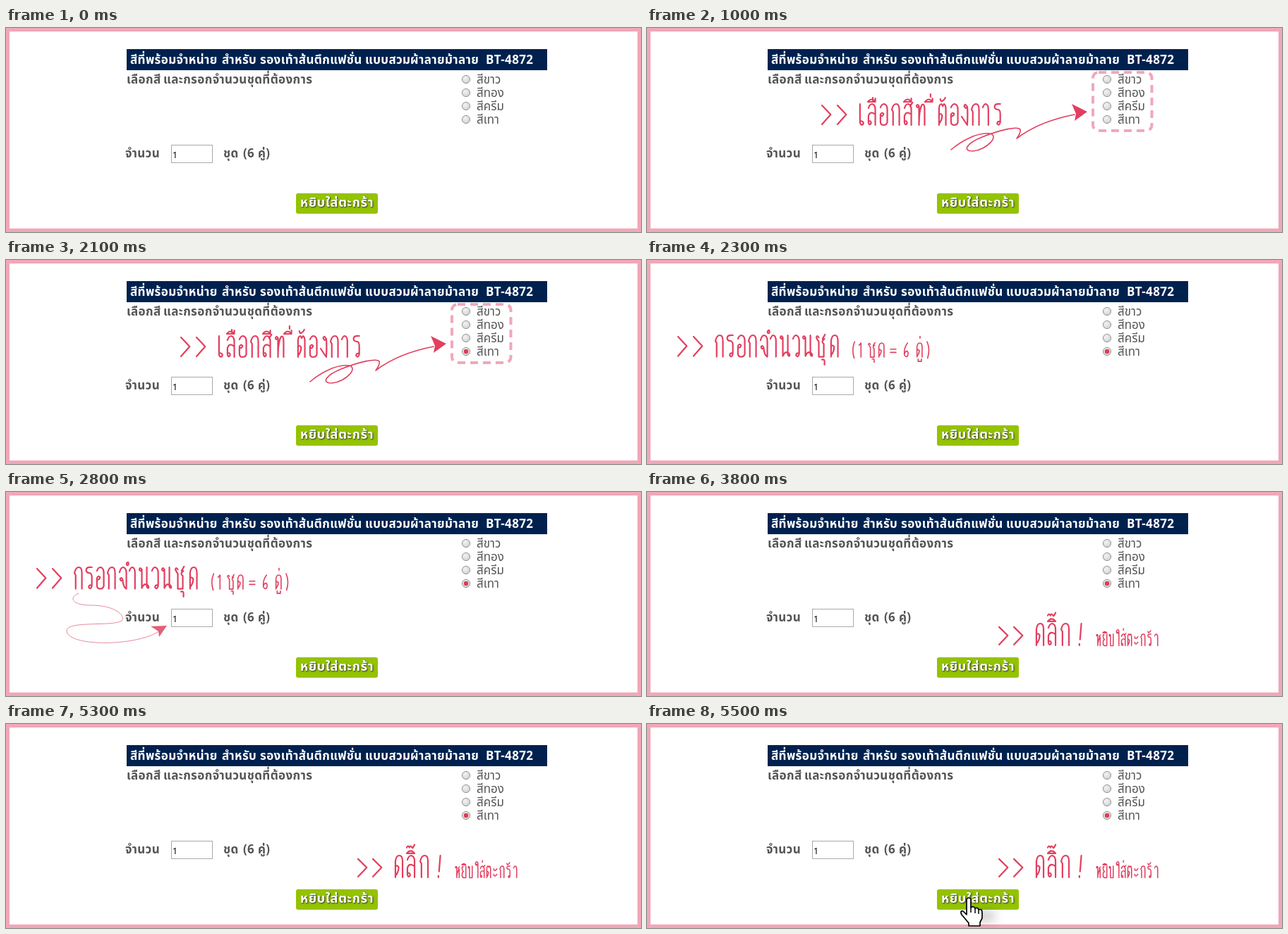
Write an HTML page that moves like this. It is 900x290 px and loops after 6000 ms.

```html
<!DOCTYPE html>
<html lang="th">
<head>
<meta charset="utf-8">
<title>วิธีสั่งซื้อ</title>
<style>
html, body { margin: 0; width: 100%; height: 100%; overflow: hidden; background: #fff; }
svg { display: block; width: 900px; height: 290px; }
text { font-family: "Noto Sans", "Noto Sans Thai", sans-serif; font-size: 17px; fill: #555; }
.bold text { font-weight: 700; letter-spacing: .35px; }
.head text { fill: #fff; }
.button text { font-size: 18px; letter-spacing: .7px; fill: #fff; text-shadow: 1px 1px 2px #333; }
.ink { fill: none; stroke: #e23f5f; stroke-linecap: round; stroke-linejoin: round; }
.ink path { vector-effect: non-scaling-stroke; }
.solid { fill: #e23f5f; }
.cue { opacity: 0; animation: 6s step-end infinite; }
#pick { animation-name: pick; }
#dot { animation-name: dot; }
#fill { animation-name: fill; }
#loop { animation-name: loop; }
#click { animation-name: click; }
#hand { animation-name: hand; }
@keyframes pick { 0% { opacity: 0 } 16.667% { opacity: 1 } 38.333%, 100% { opacity: 0 } }
@keyframes dot {
  0% { opacity: 0; transform: translateY(0) }
  25% { opacity: 1; transform: translateY(0) }
  28.333% { opacity: 1; transform: translateY(19px) }
  31.667% { opacity: 1; transform: translateY(38px) }
  35%, 100% { opacity: 1; transform: translateY(57px) }
}
@keyframes fill { 0% { opacity: 0 } 38.333% { opacity: 1 } 63.333%, 100% { opacity: 0 } }
@keyframes loop { 0% { opacity: 0 } 46.667% { opacity: 1 } 63.333%, 100% { opacity: 0 } }
@keyframes click { 0% { opacity: 0 } 63.333%, 100% { opacity: 1 } }
@keyframes hand { 0% { opacity: 0 } 80% { opacity: 1 } 88.333% { opacity: 0 } 91.667%, 100% { opacity: 1 } }
</style>
</head>
<body>
<svg viewBox="0 0 900 290">
  <defs>
    <radialGradient id="knob" cx=".4" cy=".35" r=".7">
      <stop offset="0" stop-color="#f4f4f4"/><stop offset="1" stop-color="#cfcfcf"/>
    </radialGradient>
    <filter id="soft" x="-100%" y="-150%" width="300%" height="400%"><feGaussianBlur stdDeviation="7"/></filter>
  </defs>
  <rect width="900" height="290" fill="#f0a8b9"/>
  <rect x="5" y="5" width="890" height="280" fill="#fff"/>
  <rect x="171" y="30" width="596" height="30" fill="#00214e"/>
  <g class="head bold">
    <text x="176" y="51">สีที่พร้อมจำหน่าย</text>
    <text x="306" y="51">สำหรับ</text>
    <text x="360" y="51">รองเท้าส้นตึกแฟชั่น</text>
    <text x="509" y="51">แบบสวม</text>
    <text x="573" y="51">ผ้าลายม้าลาย</text>
    <text x="680" y="51">BT-4872</text>
  </g>
  <g class="bold">
    <text x="171" y="79">เลือกสี</text>
    <text x="223" y="79">และกรอกจำนวนชุดที่ต้องการ</text>
    <text x="169" y="184">จำนวน</text>
    <text x="308" y="184">ชุด</text>
    <text x="336" y="184">(6 คู่)</text>
  </g>
  <g id="radios"></g>
  <circle id="dot" class="cue" cx="652" cy="73" r="3.2" fill="#dc3c56"/>
  <rect x="234.5" y="166.5" width="58" height="25" fill="#fff" stroke="#a9a9a9"/>
  <text x="236" y="185" style="font-size:12.5px;fill:#000">1</text>
  <g class="button bold">
    <rect x="411" y="235" width="116" height="29" rx="3" fill="#94c300"/>
    <text x="417" y="254">หยิบใส่ตะกร้า</text>
  </g>

  <g id="pick" class="cue">
    <rect x="632" y="63" width="83.5" height="83" rx="8" fill="none" stroke="#f0a8b9" stroke-width="4" stroke-dasharray="11 7"/>
    <path class="ink" stroke-width="1.6" d="M431 173C445 161 468 148 486 150C500 153 482 173 462 175C445 175 455 163 475 155C500 145 525 139 529 144Q530 149 524 157C545 141 575 129 606 123"/>
    <path class="solid" d="M602 108L624 119L606 132L608 122Z"/>
  </g>
  <g id="fill" class="cue"></g>
  <g id="loop" class="cue">
    <path class="ink" style="stroke:#e5899b" d="M103 144C88 150 94 161 120 161C158 161 170 178 164 183C150 192 85 182 86 198C90 221 190 219 218 197"/>
    <path class="solid" style="fill:#e0607a" d="M205 191L228 190L217 206L216 198Z"/>
  </g>
  <g id="click" class="cue"></g>
  <g id="hand" class="cue">
    <ellipse cx="478" cy="273" rx="18" ry="9" opacity=".18" filter="url(#soft)"/>
    <path d="M453 249Q456 245 459 249V261Q463 258 465 262Q469 260 470 264Q475 262 475 268V276L472 282V287H456V283L446 271Q443 265 448 266L453 271Z" fill="#fff" stroke="#000" stroke-width="1.7" stroke-linejoin="round"/>
    <path d="M459 261V268M465 262V269M470 264V270" stroke="#000" stroke-width="1.5"/>
  </g>
</svg>
<script>
// Handwritten letters, drawn in a cell 12 wide and 30 high
const glyphs = {
  '>': 'M0 2L14 15L0 29',
  'เ': 'M1 0V26Q2 31 6 29Q8 25 2 24',
  'ล': 'M1 6Q3 0 7 0Q12 1 12 8V30M12 15Q4 9 1 17V26Q2 31 5 28Q6 24 2 24',
  'ส': 'M1 6Q3 0 7 0Q12 1 12 8V30M12 15Q4 9 1 17V26Q2 31 5 28Q6 24 2 24M10 3L14-2',
  'อ': 'M1 5Q3 0 7 0Q12 1 12 8V26Q11 30 6 30Q1 30 1 25V15Q3 11 6 14Q5 18 1 17',
  'ก': 'M2 30V11L0 8Q2 0 7 0Q12 0 12 8V30',
  'ท': 'M4 3Q1-1 0 3Q1 7 4 3V30Q4 8 9 1Q13-1 13 8V30',
  'ต': 'M1 30V8Q1 0 5 0L7 3L9 0Q12 1 12 8V30M1 28Q6 23 6 16Q3 12 1 16',
  'ค': 'M1 30V8Q2 0 7 0Q12 0 12 8V30M1 28Q6 23 6 16Q3 12 1 16',
  'ง': 'M9 5Q6-2 4 3Q6 8 9 4Q10 12 9 30L0 18',
  'า': 'M1 5Q3 0 6 0Q10 1 10 8V30',
  'ำ': 'M1 5Q3 0 6 0Q10 1 10 8V30M-1-7Q-5-6-3-3Q1-2-1-7',
  'ร': 'M11 0Q1-1 2 5Q3 8 8 8Q11 9 11 14V26Q9 32 6 28Q6 24 11 25',
  'จ': 'M1 7Q3 0 7 0Q12 1 12 8V30Q7 28 6 17Q4 13 2 16Q2 20 6 18',
  'น': 'M4 3Q1-1 0 3Q1 7 4 3V29Q8 21 12 25M12 0V27Q15 31 15 27Q13 23 10 24',
  'ว': 'M1 5Q3 0 6 0Q11 1 11 8V26Q9 32 6 28Q6 24 11 25',
  'ช': 'M4 3Q1-1 0 3Q2 7 4 9V30H12V12Q7 9 13 5M10 5L14-1',
  'ห': 'M4 3Q1-1 0 3Q1 7 4 3V30Q5 14 11 7M11 30V10Q6 4 12 2',
  'ย': 'M4 2Q0-1 1 7Q2 13 5 14Q0 16 1 25Q2 30 6 30H12V0',
  'บ': 'M4 3Q1-1 0 3Q1 7 4 3V30H12V0',
  'ใ': 'M2-4Q5-7 5-2Q0-3 1-8Q5-15 8-8V30',
  'ะ': 'M1 7Q0 13 6 11L10 7M1 21Q0 27 6 25L10 21',
  'ี': 'M0-3Q6-10 12-3H0M12-3V-8',
  'ื': 'M0-3Q6-10 12-3H0M12-3V-8M8-5V-9',
  'ิ': 'M0-3Q6-10 12-3H0',
  '่': 'M9-10V-14',
  '้': 'M2-7Q3-3 5-4Q9-6 10-9',
  '๊': 'M0-11Q2-15 4-11Q6-15 8-11Q9-9 12-15',
  'ุ': 'M8 34Q12 33 12 36V41',
  'ู': 'M2 34V39H9V34',
  '!': 'M5 0L3 22M2 28V30',
  '(': 'M5-3Q-2 14 4 32',
  ')': 'M0-3Q7 14 1 32',
  '=': 'M0 13H12M0 20H12',
  '1': 'M1 5L5 0V30',
  '6': 'M8 0Q0 10 1 24Q3 31 8 28Q11 20 7 17Q2 18 1 24'
};

// Each letter is followed by its left edge
function write(id, y, sx, sy, width, line) {
  const parts = line.split(' ').map(p =>
    `<path d="${glyphs[p[0]]}" transform="translate(${p.slice(1)} ${y}) scale(${sx} ${sy})"/>`);
  document.getElementById(id).insertAdjacentHTML('beforeend',
    `<g class="ink" stroke-width="${width}">${parts.join('')}</g>`);
}

write('pick', 108, .88, 1, 2.2, '>248 >270 เ301 ล313 ื313 อ330 ก347 ส364 ี364 ท382 ี394 ่394 ต413 ้414 อ430 ง446 ก460 า475 ร491');
write('fill', 107, .88, 1.02, 2.2, '>44 >66 ก97 ร112 อ128 ก144 จ160 ำ174 น189 ว206 น221 ช240 ุ241 ค260');
write('fill', 118, .66, .67, 1.6, '(291 1300 ช314 ุ314 ค328 =345 6364 ค382 ู383 ่381 )397');
write('click', 190, .88, .93, 2.2, '>499 >520');
write('click', 187, .92, 1.03, 2.2, 'ค551 ล568 ิ568 ๊568 ก587 !611');
write('click', 202, .48, .55, 1.5, 'ห637 ย646 ิ646 บ655 ใ665 ส672 ่671 ต681 ะ691 ก700 ร709 ้709 า719');

document.getElementById('radios').innerHTML = ['สีขาว', 'สีทอง', 'สีครีม', 'สีเทา'].map((name, i) =>
  `<circle cx="652" cy="${73 + 19 * i}" r="5.6" fill="url(#knob)" stroke="#979797"/>
   <text x="667" y="${79 + 19 * i}">${name}</text>`).join('');
</script>
</body>
</html>
```
